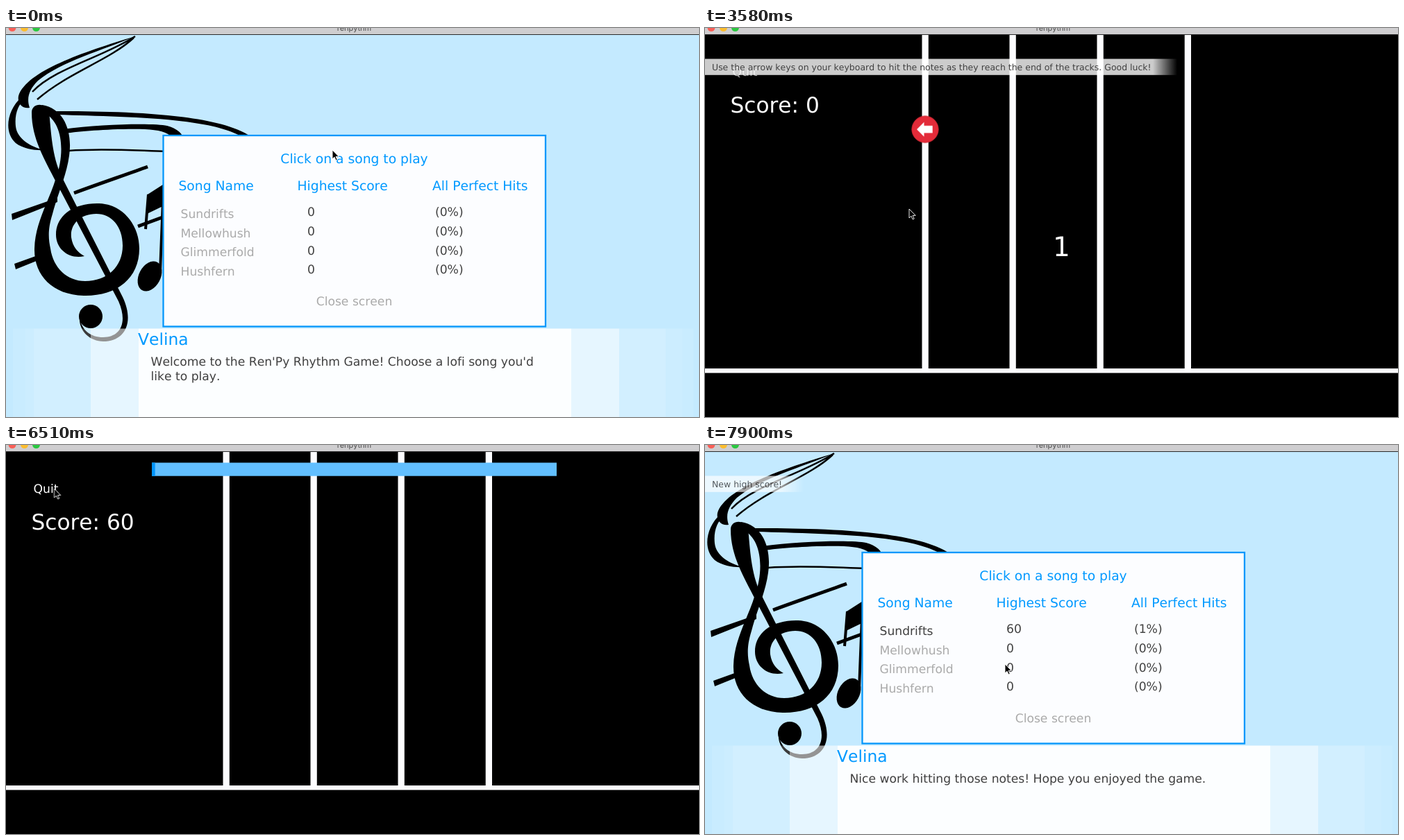
An HTML page that plays this animation: 998x561 px, repeating every 8000 ms.

```html
<!DOCTYPE html>
<html lang="en">
<head>
<meta charset="utf-8">
<title>Rhythm game</title>
<style>
  html, body { margin: 0; width: 100%; height: 100%; overflow: hidden; background: #000; }
  svg { display: block; width: 998px; height: 561px; overflow: hidden; }
  text {
    font: 17.16px "DejaVu Sans", sans-serif; font-kerning: none; font-variant-ligatures: none;
    text-rendering: geometricPrecision; white-space: pre; fill: #404040;
  }
  .mid { text-anchor: middle; }
  .head { font-size: 18.72px; fill: #0099ff; }
  .idle { fill: #aaa; }
  .name { font-size: 23.4px; fill: #0099ff; }
  .score { font-size: 31.2px; fill: #fff; }
  .count { font-size: 39px; fill: #fff; text-anchor: middle; }
  .small { font-size: 12.48px; }
  .chrome { font: 11px Inter, sans-serif; fill: #4c4c4c; text-anchor: middle; }
  .panel { fill: #fcfdff; stroke: #0597fb; stroke-width: 2.3; }

  /* 1% = 80 ms; values hold until the next key */
  .anim { animation: 8s step-end infinite; }

  .menu { animation-name: menu; }
  @keyframes menu { 0% { opacity: 1 } 13.125% { opacity: 0 } 96.875%, 100% { opacity: 1 } }
  .before { animation-name: before; }
  @keyframes before { 0% { opacity: 1 } 96.875%, 100% { opacity: 0 } }
  .after { animation-name: after; }
  @keyframes after { 0% { opacity: 0 } 96.875%, 100% { opacity: 1 } }
  .first { animation-name: first; }
  @keyframes first { 0% { fill: #aaa } 5.625% { fill: #0099ff } 96.875%, 100% { fill: #404040 } }

  .game { animation-name: game; }
  @keyframes game { 0% { opacity: 0 } 13.125% { opacity: 1 } 96.875%, 100% { opacity: 0 } }
  .three { animation-name: three; }
  @keyframes three { 0% { opacity: 1 } 26.125%, 100% { opacity: 0 } }
  .two { animation-name: two; }
  @keyframes two { 0% { opacity: 0 } 26.125% { opacity: 1 } 39.25%, 100% { opacity: 0 } }
  .one { animation-name: one; }
  @keyframes one { 0% { opacity: 0 } 39.25% { opacity: 1 } 52.125%, 100% { opacity: 0 } }

  .note { animation-name: note; }
  @keyframes note {
    0% { transform: translate(317px, -40px) }
    35.5% { transform: translate(317px, 3px); animation-timing-function: steps(19) }
    70.249% { transform: translate(317px, 546.9px) }
    70.25%, 100% { transform: translate(317px, -40px) }
  }
  .miss { animation-name: miss; }
  @keyframes miss { 0% { opacity: 1 } 70.25%, 100% { opacity: 0 } }
  .hit { animation-name: hit; }
  @keyframes hit { 0% { opacity: 0 } 70.25%, 100% { opacity: 1 } }

  .bar { animation-name: bar; }
  @keyframes bar { 0% { opacity: 0 } 52.125%, 100% { opacity: 1 } }
  .played { animation-name: played; }
  @keyframes played {
    0% { width: 583px }
    64.75% { width: 0; animation-timing-function: steps(18) }
    96.875%, 100% { width: 9.4px }
  }

  .quit { animation-name: quit; }
  @keyframes quit { 0% { fill: #aaa } 81.375% { fill: #fff } 85.125%, 100% { fill: #aaa } }
  .confirm { animation-name: confirm; }
  @keyframes confirm { 0% { opacity: 0 } 85.125%, 100% { opacity: 1 } }
  .yes { animation-name: yes; }
  @keyframes yes { 0% { fill: #aaa } 95.125%, 100% { fill: #0099ff } }

  .hint { animation-name: hint; }
  @keyframes hint {
    0% { opacity: 0 } 13.125% { opacity: .33 } 15% { opacity: .9 } 16.875% { opacity: 1 }
    53.875% { opacity: .8 } 55.75% { opacity: .5 } 57.5% { opacity: .2 } 59.375%, 100% { opacity: 0 }
  }
  .record { animation-name: record; }
  @keyframes record { 0% { opacity: 0 } 96.875% { opacity: .25 } 98.75%, 100% { opacity: .85 } }

  .cursor { animation-name: cursor; }
  @keyframes cursor {
    0% { transform: translate(470px, 176px) }
    1.875% { transform: translate(447px, 192px) }
    3.75% { transform: translate(385px, 236px) }
    5.625% { transform: translate(315px, 276px) }
    7.5% { transform: translate(294px, 261px) }
    74% { transform: translate(272px, 241px) }
    75.875% { transform: translate(200px, 176px) }
    77.75% { transform: translate(125px, 110px) }
    79.5% { transform: translate(82px, 76px) }
    81.375% { transform: translate(69.5px, 63px) }
    87% { transform: translate(110px, 91px) }
    88.875% { transform: translate(210px, 165px) }
    90.625% { transform: translate(330px, 255px) }
    92.5% { transform: translate(415px, 305px) }
    95.125%, 100% { transform: translate(432px, 316px) }
  }
</style>
</head>
<body>
<svg viewBox="0 0 998 561">
  <defs>
    <linearGradient id="fade">
      <stop offset="0" stop-color="#fff" stop-opacity=".8"/>
      <stop offset="1" stop-color="#fff" stop-opacity="0"/>
    </linearGradient>
  </defs>
  <rect width="998" height="561"/>

  <!-- song menu -->
  <g class="anim menu">
    <rect width="998" height="561" fill="#c4eaff"/>

    <!-- staff, clef and note -->
    <path d="M186 12C110 35 30 62 18 98C16 108 23 117 34 115C29 100 34 88 46 76C80 48 140 32 186 12Z
      M22 100C2 118-4 150 14 166C26 175 44 177 56 176C36 172 16 160 14 142C12 124 18 110 26 104Z
      M72 120C160 120 300 122 352 156H338C290 128 160 128 74 125Z
      M82 146C140 138 215 137 232 141C246 145 252 151 255 157H238C232 150 220 147 200 146C150 145 110 149 84 152Z
      M8 268L74 245V251L9 277Z M12 340L62 322 61 329 14 348Z
      M204 240L232 222V254L203 268Z"/>
    <g fill="none" stroke="#000">
      <path stroke-width="2.5" d="M186 12C140 42 70 58 38 92M184 14C150 46 90 64 45 103M90 177C140 173 190 177 232 178"/>
      <path stroke-width="5" d="M98 238C130 226 180 209 204 200M190 286L228 272"/>
      <path stroke-width="4" d="M205 240L201 290M226 250L222 352"/>
    </g>
    <path d="M52 111C84 116 96 150 91 184C87 214 74 240 67 268C60 290 61 304 64 318C68 346 88 365 114 365
      C146 365 168 344 168 314C168 286 152 268 130 268C106 268 92 284 94 302C96 316 104 324 113 329
      C92 334 72 320 72 298C72 270 98 252 134 253C168 254 192 284 192 318C192 362 158 387 112 386
      C66 385 40 356 41 318C42 280 62 250 72 216C84 184 84 136 54 122Z"/>
    <path d="M37 122C37 108 56 107 62 120C65 150 66 184 80 214L168 388C186 426 170 452 140 452
      C120 452 104 436 106 416C108 436 122 446 140 446C164 446 176 426 162 394L72 222C56 190 37 160 37 122Z"/>
    <circle cx="122" cy="416" r="17"/>
    <ellipse cx="207" cy="358" rx="15.5" ry="23" transform="rotate(28 207 358)"/>

    <!-- dialogue box -->
    <g fill="#fff">
      <rect x="191" y="433.5" width="623" height="128" opacity=".95"/>
      <path opacity=".58" d="M122 433.5h69v128h-69zM814 433.5h69v128h-69z"/>
      <path opacity=".23" d="M40 433.5h82v128h-82zM883 433.5h67v128h-67z"/>
      <path opacity=".14" d="M28 433.5h12v128h-12zM950 433.5h24v128h-24z"/>
      <path opacity=".08" d="M10 433.5h18v128h-18zM974 433.5h16v128h-16z"/>
    </g>
    <text class="name" x="190" y="457">Velina</text>
    <g class="anim before">
      <text x="208.5" y="487">Welcome to the Ren'Py Rhythm Game! Choose a lofi song you'd</text>
      <text x="208.5" y="508">like to play.</text>
    </g>
    <text class="anim after" x="208.5" y="487">Nice work hitting those notes! Hope you enjoyed the game.</text>

    <!-- song list -->
    <rect class="panel" x="226.5" y="155" width="550.5" height="275.5"/>
    <text class="head mid" x="501.5" y="195">Click on a song to play</text>
    <text class="head" x="248.5" y="234">Song Name</text>
    <text class="head" x="419.5" y="234">Highest Score</text>
    <text class="head" x="614" y="234">All Perfect Hits</text>
    <text class="anim first" x="251.5" y="274">Sundrifts</text>
    <text class="idle" x="251.5" y="302">Mellowhush</text>
    <text class="idle" x="251.5" y="329.3">Glimmerfold</text>
    <text class="idle" x="251.5" y="357">Hushfern</text>
    <g class="anim before"><text x="434" y="271.3">0</text><text x="618" y="271.3">(0%)</text></g>
    <g class="anim after"><text x="434" y="271.3">60</text><text x="618" y="271.3">(1%)</text></g>
    <text x="434" y="299">0</text><text x="618" y="299">(0%)</text>
    <text x="434" y="326.7">0</text><text x="618" y="326.7">(0%)</text>
    <text x="434" y="354.2">0</text><text x="618" y="354.2">(0%)</text>
    <text class="idle mid" x="501.5" y="400">Close screen</text>
  </g>

  <!-- game -->
  <g class="anim game">
    <rect width="998" height="561"/>
    <path fill="#fcfcfe" d="M312.5 10h9.3v482h-9.3zM438.5 10h9.3v482h-9.3zM564.5 10h9.3v482h-9.3zM690.7 10h9.3v482h-9.3zM0 491h998v6.5H0z"/>
    <g class="anim note">
      <circle r="19.2" fill="#e32b39" stroke="#c92733" stroke-width=".8"/>
      <path fill="#fff" d="M-12 0L-1.5-10.5V-5.3H10.7V5.3H-1.5V10.5Z"/>
    </g>
    <g class="anim bar">
      <rect x="210" y="25.5" width="583" height="19.2" fill="#62bfff"/>
      <rect class="anim played" x="210" y="25.5" width="583" height="19.2" fill="#0095ff"/>
    </g>
    <text class="anim quit" x="39.5" y="68.5">Quit</text>
    <text class="anim miss score" x="36.5" y="122">Score: 0</text>
    <text class="anim hit score" x="36.5" y="122">Score: 60</text>
    <text class="anim three count" x="513.5" y="328.5">3</text>
    <text class="anim two count" x="513.5" y="328.5">2</text>
    <text class="anim one count" x="513.5" y="328.5">1</text>

    <g class="anim confirm">
      <rect y="9" width="998" height="551" fill="#fff" opacity=".6"/>
      <rect class="panel" x="292" y="226.5" width="419" height="133"/>
      <text class="mid" x="501" y="273">Would you like to quit the rhythm game?</text>
      <text class="anim yes mid" x="447" y="321.5">Yes</text>
      <text class="idle mid" x="557.5" y="321.5">No</text>
    </g>
  </g>

  <!-- notifications -->
  <g class="anim hint">
    <rect y="44.5" width="645" height="23.3" fill="#fff" opacity=".8"/>
    <rect x="645" y="44.5" width="35" height="23.3" fill="url(#fade)"/>
    <text class="small" x="10" y="61">Use the arrow keys on your keyboard to hit the notes as they reach the end of the tracks. Good luck!</text>
  </g>
  <g class="anim record">
    <rect y="44.5" width="108" height="23.3" fill="#fff" opacity=".8"/>
    <rect x="108" y="44.5" width="34" height="23.3" fill="url(#fade)"/>
    <text class="small" x="10" y="61">New high score!</text>
  </g>

  <!-- window bar -->
  <rect width="998" height="9" fill="#cfced0"/>
  <rect y="9" width="998" height="1" fill="#2a2a2a"/>
  <circle cx="9" cy="-.5" r="5.5" fill="#f95f57"/>
  <circle cx="26.5" cy="-.5" r="5.5" fill="#fbbd2e"/>
  <circle cx="43.5" cy="-.5" r="5.5" fill="#2bc840"/>
  <text class="chrome" x="501.5" y="3.5">renpythm</text>

  <path class="anim cursor" d="M0 0V13L3 10.2 5.2 15 7.2 14.1 5.1 9.4H9.2Z" stroke="#fff" stroke-width=".9"/>
</svg>
</body>
</html>
```
